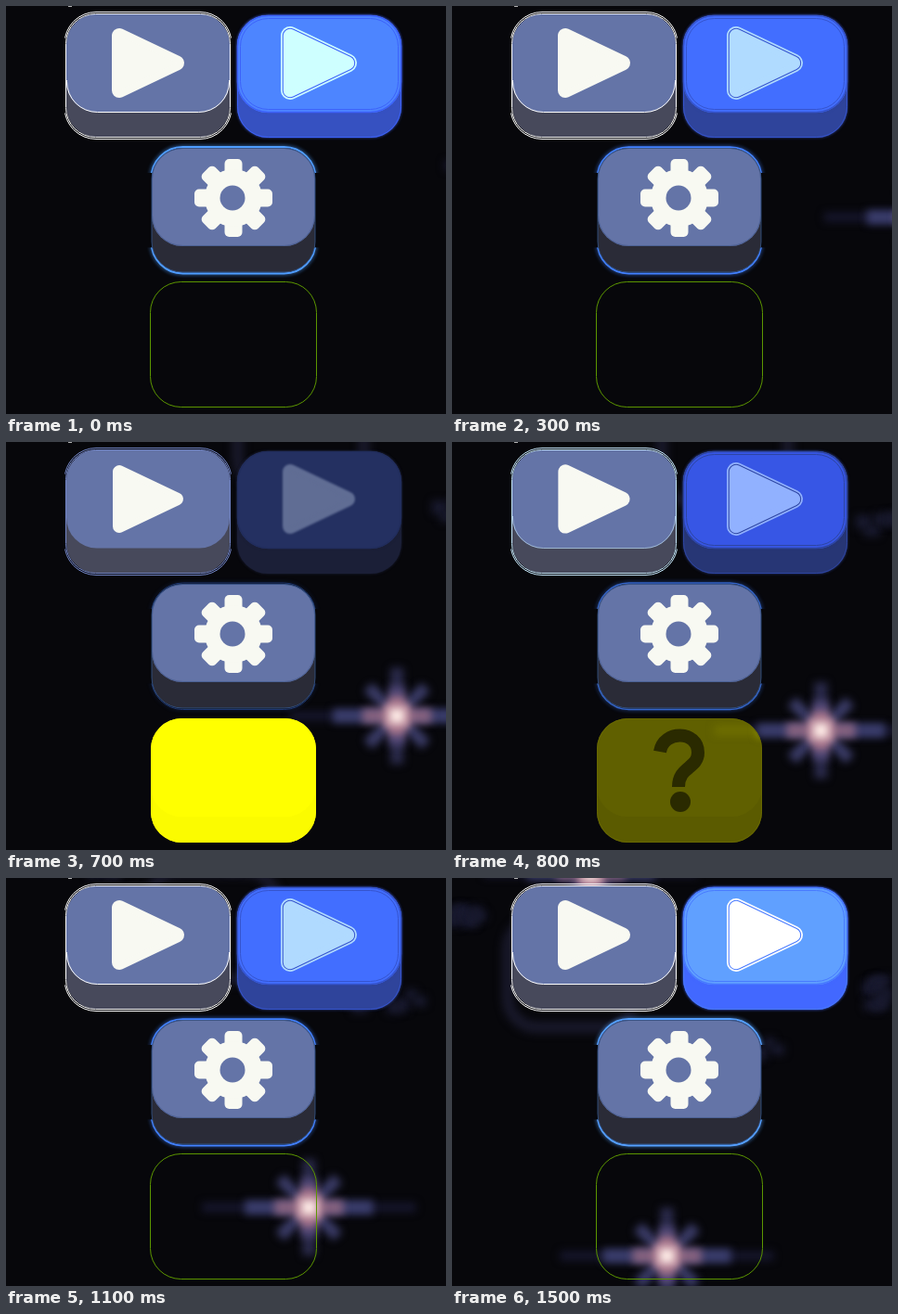
These frames come from a looping animation (474 px wide and 440 px high, 1.6 s). An HTML page with a canvas:

```html
<!DOCTYPE html>
<html lang="en">
<head>
<meta charset="utf-8">
<title>Glowing buttons</title>
<style>
html, body { margin: 0; width: 100%; height: 100%; overflow: hidden; background: #07070b; }
canvas { display: block; }
</style>
</head>
<body>
<canvas id="stage" width="474" height="440"></canvas>
<script>
const ctx = document.getElementById('stage').getContext('2d');
const LOOP = 1600, STEP = 100, PULSE = LOOP / 3;
const SLATE = '#6474a7', IVORY = '#f8f9f2';

const clamp = v => Math.max(0, Math.min(1, v));
const rgb = c => `rgb(${c.map(Math.round).join(',')})`;
// Blend two colours; each channel rises at its own rate and saturates.
const mix = (dark, bright, u, gains = [1, 1, 1]) =>
  rgb(dark.map((v, i) => v + (bright[i] - v) * clamp(u * gains[i])));

// Draw with temporary context settings.
function using(settings, paint) {
  ctx.save();
  Object.assign(ctx, settings);
  paint();
  ctx.restore();
}
function fillBox(x, y, w, h, r, color) {
  ctx.beginPath();
  ctx.roundRect(x, y, w, h, r);
  ctx.fillStyle = color;
  ctx.fill();
}
function strokeBox(x, y, w, h, r, color, width = 1) {
  ctx.beginPath();
  ctx.roundRect(x, y, w, h, r);
  ctx.strokeStyle = color;
  ctx.lineWidth = width;
  ctx.stroke();
}
function bar(x, y, w, h, color) {
  ctx.fillStyle = color;
  ctx.fillRect(x - w / 2, y - h / 2, w, h);
}
function keycap(x, y, w, h, faceH, face, side) {
  fillBox(x, y, w, h, 33, side);
  fillBox(x, y, w, faceH, 33, face);
}
// An outline that shows along the top, the bottom and the corners only.
function capOutline(x, y, w, h, color, width) {
  using({}, () => {
    ctx.beginPath();
    ctx.rect(x - 6, y - 6, w + 12, 34);
    ctx.rect(x - 6, y + h - 28, w + 12, 34);
    ctx.clip();
    strokeBox(x, y, w, h, 34, color, width);
  });
}
function playIcon(dx, color, grow = 0) {
  ctx.beginPath();
  ctx.moveTo(122 + dx, 32);
  ctx.lineTo(122 + dx, 91);
  ctx.lineTo(184 + dx, 61.5);
  ctx.closePath();
  ctx.lineJoin = 'round';
  ctx.lineWidth = 15 + grow;
  ctx.strokeStyle = ctx.fillStyle = color;
  ctx.stroke();
  ctx.fill();
}

// Everything in the sky drifts along the same shallow curve.
const driftX = t => 587 - 0.237 * t;
const driftY = t => 172 + 0.193 * t - 2.4e-5 * t * t;

function star(x, y) {
  using({ filter: 'blur(4px)' }, () => {
    ctx.translate(x, y);
    bar(0, 0, 230, 10, '#16162c');
    bar(0, 0, 138, 15, '#3a3d6c');
    bar(0, 0, 14, 104, '#2a2a4a');
    for (let i = 0; i < 2; i++) {
      ctx.rotate(Math.PI / 4 + i * Math.PI / 2);
      bar(0, 0, 88, 13, '#3a3b66');
      ctx.rotate(-Math.PI / 4 - i * Math.PI / 2);
    }
    bar(0, 0, 17, 64, '#4e4674');
    bar(0, 0, 74, 15, '#86627f');
    bar(0, 0, 17, 42, '#a07088');
    bar(0, 0, 28, 26, '#bb8a9b');
    bar(0, 0, 15, 15, '#ffeee8');
  });
}
// A smudge of faint dabs, scattered the same way every time.
function smudge(x, y, w, h) {
  for (let i = 1; i <= 9; i++) {
    const rand = k => Math.abs(Math.sin(i * k) * 1e4) % 1;
    bar(x + w * i / 10, y + h * rand(7.3), 10 + 8 * rand(3.1), 10 + 5 * rand(5.7), '#191a2f');
  }
}
function sky(t) {
  const x = driftX(t), y = driftY(t);
  using({ filter: 'blur(4px)' }, () => {
    ctx.translate(x - driftX(1500), y - driftY(1500));
    strokeBox(60, 45, 136, 116, 32, '#181829', 13);
    smudge(268, 176, 92, 18);
    smudge(-6, 34, 40, 14);
    smudge(448, 108, 22, 32);
  });
  star(x - 82, y - 413);
  star(x, y);
}

function whiteButton(u) {
  const line = mix([115, 134, 200], [255, 255, 255], u, [2, 2.7, 6]);
  keycap(65, 8.5, 176, 133, 106, SLATE, '#47495b');
  using({ globalAlpha: clamp(u * 2) }, () => {
    ctx.beginPath();
    ctx.rect(60, 80, 186, 40);
    ctx.clip();
    strokeBox(65.5, 8.5, 175, 106, 33, line);
  });
  strokeBox(64.5, 8.5, 177, 133, 32, line);
  capOutline(63, 6.5, 180, 137, line, 1);
  playIcon(0, IVORY, clamp(u * 2) * 2 - 1);
}
function blueButton(u) {
  const face = mix([36, 48, 97], [96, 160, 255], u, [1, 1.1, 2.7]);
  const side = mix([27, 31, 55], [66, 104, 255], u);
  const rim = mix([33, 45, 92], [72, 122, 255], u, [1, 1, 1.4]);
  const icon = mix([96, 109, 148], [255, 255, 255], u, [1, 1.5, 6]);
  using({ shadowColor: side, shadowBlur: 3 }, () => keycap(249, 10, 177, 132, 105, face, side));
  strokeBox(249.5, 10.5, 176, 104, 33, rim, 1.5);
  using({ filter: 'blur(1px)' }, () => playIcon(184, icon, 1));
  using({ globalAlpha: clamp(u * 6) }, () => {
    strokeBox(252.5, 13.5, 170, 98, 30, rim);
    strokeBox(249.5, 10.5, 176, 131, 33, rim);
    playIcon(184, icon, 5);
    playIcon(184, rim, 1.5);
    playIcon(184, icon, -0.5);
  });
}
function gearButton(u) {
  const glow = mix([30, 55, 112], [85, 160, 255], u, [1.3, 1.4, 2]);
  using({ shadowColor: glow, shadowBlur: 4 }, () =>
    capOutline(156.5, 152, 177, 136.5, glow, 1 + clamp(u * 1.5)));
  keycap(157, 153.5, 176, 133.5, 105.5, SLATE, '#2a2b37');
  strokeBox(157, 153.5, 176, 133.5, 33, '#37588f', 0.8);
  strokeBox(157.5, 153.5, 175, 105, 33, '#3d5588', 0.6);

  using({}, () => {
    ctx.translate(245, 207);
    for (let i = 0; i < 4; i++) {
      fillBox(-42, -9.5, 84, 19, 5, IVORY);
      ctx.rotate(Math.PI / 4);
    }
    fillBox(-31, -31, 62, 62, 31, IVORY);
    fillBox(-12.5, -13.5, 27, 27, 13.5, SLATE);
  });
}
// Light up yellow as the other buttons go dark.
function helpButton(u) {
  const level = 249 * clamp(1.1 - 2.4 * u);
  if (!level) return strokeBox(155.5, 297.5, 179, 135, 33, '#5c9600');

  const yellow = v => rgb([v, v, 0]);
  using({ globalCompositeOperation: 'lighter' }, () => {
    fillBox(156, 298, 178, 134, 33, yellow(level - 5));
    fillBox(156, 298, 178, 106, 33, yellow(5));
  });
  using({ globalCompositeOperation: 'multiply' }, () => fillBox(156, 298, 178, 134, 33, '#ff0'));
  strokeBox(156.5, 298.5, 177, 133, 33, yellow(level + 15));

  using({ globalAlpha: 0.9, lineWidth: 14 }, () => {
    ctx.strokeStyle = ctx.fillStyle = yellow(level * (1.03 - 2 * u));
    ctx.beginPath();
    ctx.moveTo(224, 334);
    ctx.bezierCurveTo(228, 310, 265, 311, 265, 335);
    ctx.bezierCurveTo(265, 352, 244, 350, 244, 372);
    ctx.stroke();
    ctx.beginPath();
    ctx.arc(246, 388, 11, 0, 7);
    ctx.fill();
  });
}

function draw(t) {
  // Three pulses per loop, one of them peaking at 1500 ms.
  const u = (1 + Math.cos((t - 1500) / PULSE * 2 * Math.PI)) / 2;
  ctx.fillStyle = '#07070b';
  ctx.fillRect(0, 0, 474, 440);
  sky(t);
  bar(69, 0.5, 4, 1, '#b0b0b0');
  whiteButton(u);
  blueButton(u);
  gearButton(u);
  helpButton(u);
}

function tick() {
  draw(Math.floor((performance.now() % LOOP) / STEP) * STEP);
  requestAnimationFrame(tick);
}
tick();
</script>
</body>
</html>
```
